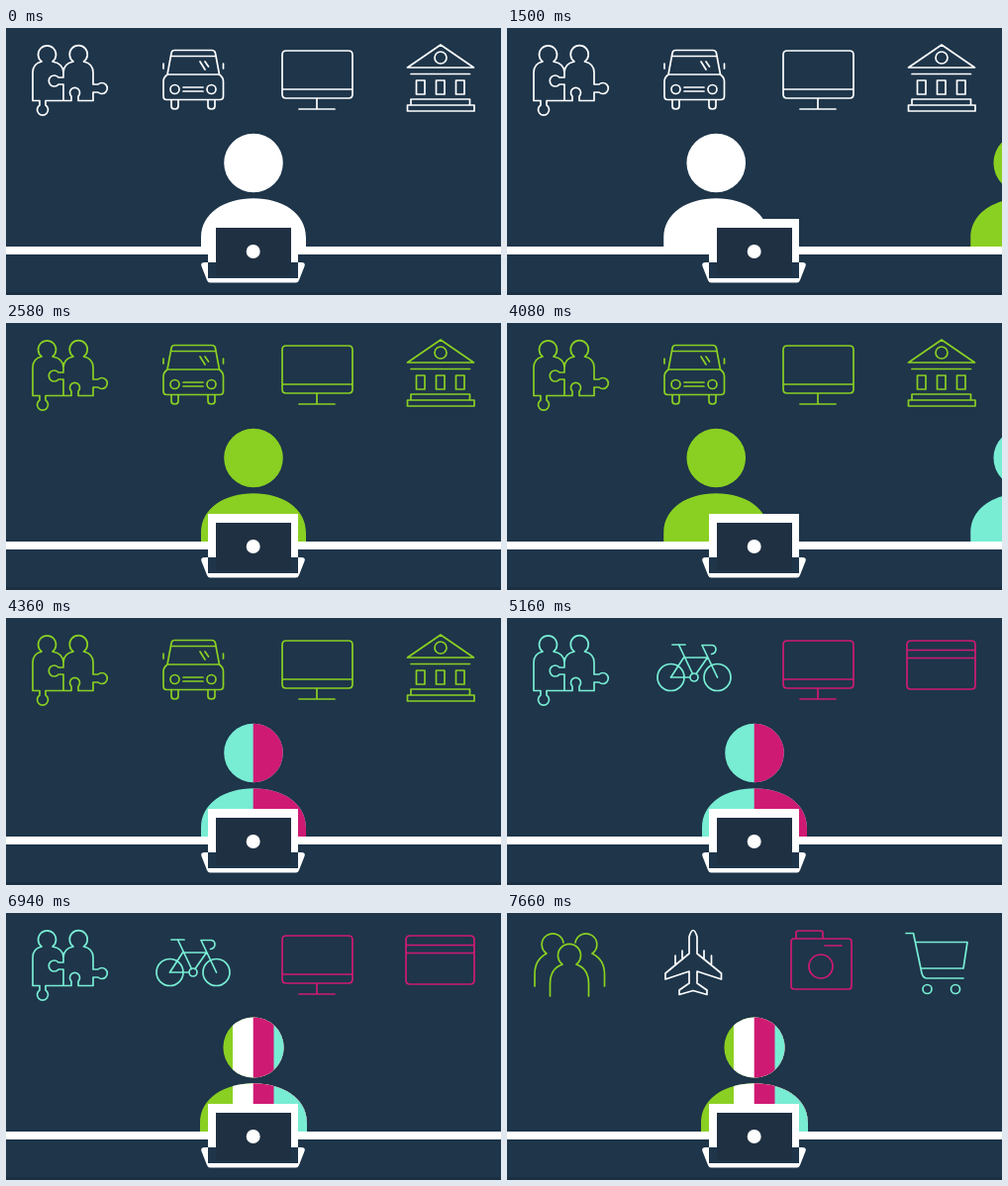
Write an HTML page with a canvas that moves like this. It is 500x270 px and loops after 8 s.

```html
<!DOCTYPE html>
<html lang="en">
<head>
<meta charset="utf-8">
<title>Personas and their interests</title>
<style>
html, body { margin: 0; overflow: hidden; background: #1e354a; }
canvas { display: block; }
</style>
</head>
<body>
<canvas id="stage" width="500" height="270"></canvas>
<script>
const ctx = document.getElementById('stage').getContext('2d');
const WHITE = '#fff', GREEN = '#8ad022', TEAL = '#78edd4', PINK = '#cf1a74';
const HOLD = 1500, CYCLE = 2580, LOOP = 8000, STEP = 40;
const SLIDE = 320, SPACING = 310, OUT = 160, IN = 280, LIFT = 100;

const ring = (x, y, r) => `M${x + r} ${y}a${r} ${r} 0 1 1 ${-2 * r} 0a${r} ${r} 0 1 1 ${2 * r} 0`;
const box = (x, y, w, h) => `M${x} ${y}h${w}v${h}h${-w}Z`;
const rounded = (x, y, w, h, r) =>
  `M${x + r} ${y}h${w - 2 * r}q${r} 0 ${r} ${r}v${h - 2 * r}q0 ${r} ${-r} ${r}` +
  `h${2 * r - w}q${-r} 0 ${-r} ${-r}v${2 * r - h}q0 ${-r} ${r} ${-r}Z`;

const shapes = {
  puzzle: 'M58 49V45Q58 36 47 34A9 9 0 1 0 36 34Q27 36 27 45V73.5H34V78A5.5 5.5 0 1 0 40 78V73.5H58V57H53' +
    'A5.5 5.5 0 1 1 53 50H58M58 45Q58 36 68 34A9 9 0 1 1 78.5 34Q88 36 88 45V57H93A5.5 5.5 0 1 1 93 65H88' +
    'V73.5H73V69A5 5 0 1 0 66 69V73.5H58',
  van: 'M163 47L167 25.5Q167.5 22.5 170 22.5H208Q211 22.5 211.5 25.5L215.5 47M167 28.5H212' +
    'M163 47H215.5Q219.5 50 219.5 54V69Q219.5 72.5 216 72.5H162Q159 72.5 159 69V54Q159 50 163 47Z' +
    'M179 60H199M179 64H199M159 36V41M219.5 36V41M196 34L201 42M201 34L204.5 39' +
    'M167 72.5V79Q167 82 170.5 82T174 79V72.5M204 72.5V79Q204 82 207.5 82T211 79V72.5' +
    ring(170.5, 62, 4.5) + ring(207.5, 62, 4.5),
  monitor: rounded(279, 23, 71, 48, 4) + 'M279 62H350M314 71V82M296 82H332',
  bank: 'M405.5 40L439 17L472.5 40ZM409 46.5H468.5' + ring(439, 30, 6) +
    box(414.5, 53, 8.5, 14) + box(434.5, 53, 8.5, 14) + box(454.5, 53, 8.5, 14) +
    box(409, 72, 59.5, 6) + box(405.5, 78, 67.5, 6),
  bike: ring(165.5, 60, 13.5) + ring(212.5, 60, 13.5) + ring(189, 60, 4) +
    'M167 27H180M173.5 27L187.5 56.5M178.5 40H202.5M165.5 60L178.5 40M165.5 60H185M191 56.5L202.5 40' +
    'M212.5 60L197 27.5H207.5Q211 28 211 32Q210.5 36 206.5 36.5',
  card: rounded(404, 23, 69, 49, 4) + 'M404 32.5H473M404 40.5H473',
  group: 'M28 74V62Q28 47 40 41A11 11 0 1 1 57 30M98.5 74V62Q98.5 47 86 41A11 11 0 1 0 69 30' +
    'M43.5 84V72Q43.5 56 56 52A11.5 11.5 0 1 1 70 52Q82.5 56 82.5 72V84',
  plane: 'M184 41V24Q188 11 192 24V41L216.5 61V67L192 59V71L202 78V82.5L188 78.5L174 82.5V78L184 71V59L160 67V61Z' +
    'M170 43V52M177 38V46M199 38V46M206.5 43V52',
  camera: rounded(287, 26, 61, 51, 3) + 'M292 26V20Q292 18 294 18H317Q319 18 319 20V26M321 33H338' + ring(317, 54, 12),
  cart: 'M403 20.5H410.5L419 61Q420.5 66 424 66H461M413 29.5H465L461 56H418' + ring(424.5, 77, 4.5) + ring(453, 77, 4.5)
};
for (const key in shapes) shapes[key] = new Path2D(shapes[key]);

// stripes: [colour, left edge]; icons: [shape, colour]
const scenes = [
  { stripes: [[WHITE, 190]],
    icons: [['puzzle', WHITE], ['van', WHITE], ['monitor', WHITE], ['bank', WHITE]] },
  { stripes: [[GREEN, 190]],
    icons: [['puzzle', GREEN], ['van', GREEN], ['monitor', GREEN], ['bank', GREEN]] },
  { stripes: [[TEAL, 190], [PINK, 249.7]],
    icons: [['puzzle', TEAL], ['bike', TEAL], ['monitor', PINK], ['card', PINK]] },
  { stripes: [[GREEN, 190], [WHITE, 229], [PINK, 249.7], [TEAL, 270.5]], grow: 1,
    icons: [['group', GREEN], ['plane', WHITE], ['camera', PINK], ['cart', TEAL]] }
];

const desk = new Path2D(box(0, 221, 500, 8) + box(204, 193, 91, 60) +
  'M204 237H201Q196 237 197.5 241L203 255Q204 257.5 206 257.5H293Q295 257.5 296 255L301.5 241Q303 237 298 237H295Z');

const clamp = x => Math.max(0, Math.min(1, x));
const backOut = p => 1 + 2.7 * (p - 1) ** 3 + 1.7 * (p - 1) ** 2;

function drawPerson({ stripes, grow = 0 }, dx) {
  const l = 197 - grow, r = 303 + grow;
  const body = new Path2D(ring(250, 136.5 - grow / 2, 29.8 + grow * 0.8) +
    `M${l} 223V212C${l} 187 221 172.3 250 172.3S${r} 187 ${r} 212V223Z`);
  ctx.save();
  ctx.translate(dx, 0);
  ctx.clip(body);
  for (const [colour, x] of stripes) {
    ctx.fillStyle = colour;
    ctx.fillRect(x, 100, 320 - x, 123);
  }
  ctx.restore();
}

function drawIcon([shape, colour], dy) {
  ctx.save();
  ctx.translate(0, dy);
  ctx.strokeStyle = colour;
  ctx.stroke(shapes[shape]);
  ctx.restore();
}

function draw(t) {
  const index = Math.min(2, Math.floor(t / CYCLE));
  const step = Math.max(0, Math.floor((t - index * CYCLE - HOLD) / STEP) + 1);
  const u = step * STEP;
  const now = scenes[index], next = scenes[index + 1];
  const [gap, end] = index === 2 ? [80, 1040] : [120, 1120];

  ctx.fillStyle = '#1e354a';
  ctx.fillRect(0, 0, 500, 270);
  ctx.fillStyle = '#1b2f42';
  ctx.fillRect(0, 267, 500, 3);

  const shift = clamp(u / SLIDE) * SPACING;
  drawPerson(now, -shift);
  drawPerson(next, SPACING - shift);

  ctx.fillStyle = WHITE;
  ctx.fill(desk);
  ctx.fillStyle = '#1f3042';
  ctx.fillRect(212, 202, 76, 48);
  ctx.fillStyle = WHITE;
  ctx.fill(new Path2D(ring(249.7, 226, 7)));

  ctx.lineWidth = 1.7;
  ctx.lineJoin = ctx.lineCap = 'round';
  for (let i = 0; i < 4; i++) {
    const leave = clamp((u - SLIDE - i * gap) / OUT);
    const enter = clamp((u - end + IN + (3 - i) * gap) / IN);
    if (leave < 1) drawIcon(now.icons[i], -LIFT * leave ** 2);
    if (enter > 0) drawIcon(next.icons[i], LIFT * (backOut(enter) - 1));
  }
}

const start = performance.now();
function tick() {
  draw((performance.now() - start) % LOOP);
  requestAnimationFrame(tick);
}
tick();
</script>
</body>
</html>
```
